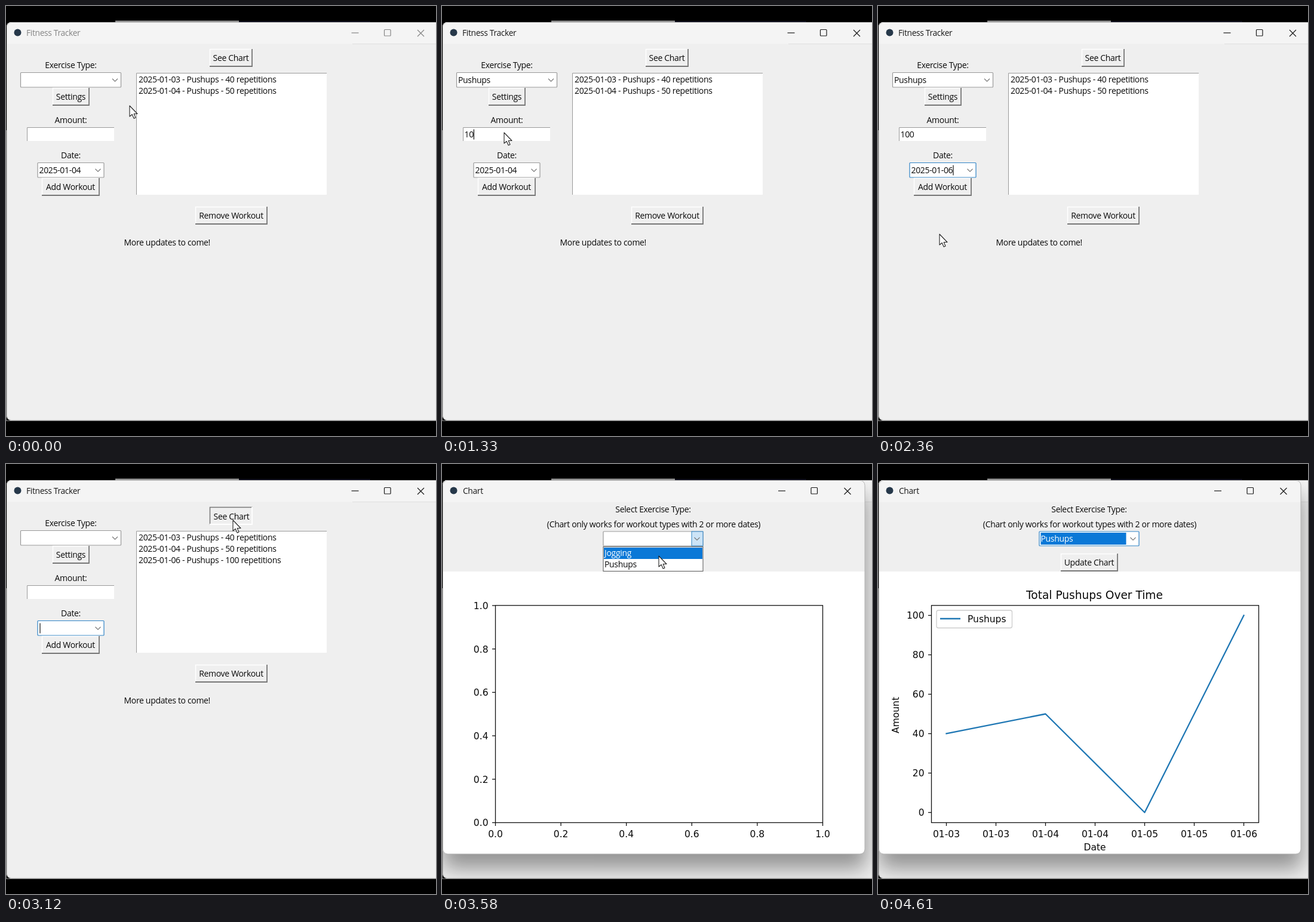
Animation, 720 px wide and 720 px high, one loop 4.7 s. Source, as an HTML page:

```html
<!DOCTYPE html>
<html lang="en">
<head>
<meta charset="utf-8">
<title>Fitness Tracker</title>
<style>
  html, body { margin: 0; width: 100%; height: 100%; overflow: hidden; background: #000; }
  svg { display: block; width: 100vw; height: 100vh; }
  text { font: 14px "Open Sans", "Noto Sans", sans-serif; letter-spacing: -.33px; fill: #0a0a0a; }
  .title { font-size: 13.8px; }
  .cal text { font: 14.5px "Liberation Sans", Arial, sans-serif; letter-spacing: 0; }
  .cal .head { font-size: 15.2px; fill: #eee; }
  .plot text { font: 15.5px "DejaVu Sans", sans-serif; letter-spacing: 0; }
  .plot .name { font-size: 18.6px; }
</style>
</head>
<body>
<svg viewBox="0 0 720 720">
  <defs>
    <clipPath id="screen"><rect y="25" width="720" height="670"/></clipPath>
    <clipPath id="win"><rect x="1" y="27" width="740" height="667" rx="8"/></clipPath>
    <filter id="blur" x="-20%" y="-20%" width="140%" height="140%"><feGaussianBlur stdDeviation="17"/></filter>
  </defs>
  <g id="scene"></g>
  <g clip-path="url(#screen)">
    <path id="cursor" d="M0 0V18L4.2 14.5 7.2 21.2 10 20 7.2 13.5H13Z" fill="#fff" stroke="#222" stroke-width="1.1" stroke-linejoin="round"/>
  </g>
</svg>
<script>
const LOOP = 4700;
const BLUE = '#0a78d7';
const FOCUS = '#2f83c6';

// Interface changes: [time, changed fields]
const steps = [
  [0, { type: '', amount: '', date: '2025-01-04', rows: 2, chartType: '' }],
  [240, { active: true, open: 'type' }],
  [520, { open: '', type: 'Pushups', focus: 'type' }],
  [940, { focus: 'amount' }],
  [1180, { amount: '1' }],
  [1300, { amount: '10' }],
  [1420, { amount: '100' }],
  [1730, { focus: 'date', open: 'date' }],
  [1890, { open: 'calendar' }],
  [2270, { open: '', date: '2025-01-06' }],
  [2620, { pressed: 'Add Workout' }],
  [2700, { pressed: '', type: '', amount: '', date: '', rows: 3 }],
  [3100, { pressed: 'See Chart' }],
  [3190, { pressed: '' }],
  [3240, { chart: true }],
  [3420, { open: 'chart' }],
  [3680, { open: '', chartType: 'Pushups', focus: 'chart' }],
  [3820, { pressed: 'Update Chart' }],
  [3890, { pressed: '', plotted: true }],
];

// Pointer path: [time, x, y]
const path = [
  [0, 207, 167], [30, 207, 167], [200, 178, 123], [260, 178, 123], [500, 134, 170],
  [660, 134, 170], [900, 104, 212], [1440, 104, 212], [1690, 156, 269], [1820, 156, 269],
  [2180, 103, 382], [2380, 103, 382], [2580, 108, 300], [2860, 108, 300], [3080, 380, 94],
  [3240, 380, 94], [3370, 424, 121], [3420, 424, 121], [3570, 363, 154], [3590, 363, 154],
  [3660, 365, 165], [3720, 365, 165], [3800, 357, 162], [3970, 357, 162], [4030, 378, 165],
  [4270, 378, 165], [4570, 330, 700], [LOOP, 330, 700],
];

const workouts = [['03', 40], ['04', 50], ['06', 100]]
  .map(([day, n]) => `2025-01-${day} - Pushups - ${n} repetitions`);

const list = (n, fn) => Array.from({ length: n }, (_, i) => fn(i)).join('');
const rect = (x, y, w, h, fill, more = '') =>
  `<rect x="${x}" y="${y}" width="${w}" height="${h}" fill="${fill}" ${more}/>`;
const line = (d, color, width = 1, more = '') =>
  `<path d="${d}" fill="none" stroke="${color}" stroke-width="${width}" ${more}/>`;
// y is the vertical middle of the capitals
const text = (x, y, s, anchor = 'start', more = '') =>
  `<text x="${x}" y="${y + 4.9}" text-anchor="${anchor}" ${more}>${s}</text>`;
const label = (x, y, s) => text(x, y, s, 'middle');

function button(x, y, w, s, pressed) {
  const down = s === pressed;
  const r = x + w, b = y + 30, shift = down ? 1 : 0;
  const [light, dark] = down ? ['#777', '#fff'] : ['#fff', '#777'];
  return rect(x, y, w, 30, '#efefef') +
    line(`M${x + .5} ${b}V${y + .5}H${r}`, light, 1.5) +
    line(`M${r - 1} ${y}V${b - 1}H${x}`, dark, 1.8) +
    label(x + w / 2 - .5 + shift, y + 14.6 + shift, s);
}

const sunken = (x, y, w, h) => rect(x, y, w, h, '#fff') +
  line(`M${x + .5} ${y + h}V${y + .5}H${x + w}`, '#9a9a9a');

const caret = (x, y) => line(`M${x} ${y - 8}V${y + 9}`, '#111', 1.2);

function combo(x, y, w, h, s, { focus, hot, selected }) {
  const r = x + w, mid = y + h / 2, cx = r - 10.5;
  return rect(x + .5, y + .5, w - 1, h - 1, '#fff', `stroke="${focus ? FOCUS : '#999'}" stroke-width="1.2" rx="1"`) +
    (hot ? rect(r - 19.5, y + .5, 19, h - 1, '#cce4f7', `stroke="${FOCUS}"`) : '') +
    (selected ? rect(x + 3, y + 2.5, w - 25, h - 5, BLUE) : '') +
    line(`M${cx - 4.5} ${mid - 2}l4.5 4.5 4.5 -4.5`, '#777', 1.1) +
    text(x + 3, mid + .2, s, 'start', selected ? 'style="fill:#fff"' : '');
}

function popup(x, y, hover) {
  const items = ['Jogging', 'Pushups'];
  return rect(x + .5, y + .5, 167, 41, '#fff', 'stroke="#555"') +
    items.map((s, i) => (i === hover ? rect(x + 1.5, y + 2 + i * 19, 165, 19, BLUE) : '') +
      text(x + 2.5, y + 11.5 + i * 19, s, 'start', i === hover ? 'style="fill:#fff"' : '')).join('');
}

function titleBar(s, min, active) {
  const ink = active ? '#1a1a1a' : '#858585';
  return '<circle cx="19.5" cy="44.5" r="6" fill="#26384a"/>' +
    text(s === 'Chart' ? 35 : 34, 45, s, 'start', `class="title" style="fill:${ink}"`) +
    line(`M${min} 45h12`, ink, 1.2) +
    rect(min + 55, 39.5, 10.5, 10.5, 'none', `rx="1" stroke="${ink}" stroke-width="1.2"`) +
    line(`M${min + 110.5} 40l11 11m0 -11l-11 11`, ink, 1.2);
}

function calendar() {
  const colX = i => 82 + i * 37.7, rowY = j => 341 + j * 27.1;
  const arrow = (x, dir) => rect(x, 290, 20, 21, '#f4f4f4') +
    `<path d="M${x + 10 - 3 * dir} 295.5v10l${6 * dir} -5z" fill="#111"/>`;
  const cell = k => {
    const i = k % 7, j = Math.floor(k / 7), n = k - 1;
    const other = n < 1 || n > 31, weekend = i > 4, chosen = n === 4;
    const day = n < 1 ? n + 31 : n > 31 ? n - 31 : n;
    const bg = chosen ? BLUE : weekend ? (other ? '#bebebe' : '#cbcbcb') : other ? '#eee' : '#fff';
    const ink = chosen ? '#fff' : other ? (weekend ? '#808080' : '#999') : weekend ? '#737373' : '#111';
    return rect(colX(i), rowY(j), 37.7, 27.1, bg, 'stroke="#c4c4c4"') +
      text(colX(i) + 18.5, rowY(j) + 12.9, day, 'middle', `style="fill:${ink}"`);
  };
  const days = ['Mon', 'Tue', 'Wed', 'Thu', 'Fri', 'Sat', 'Sun'];
  return '<g class="cal">' + rect(53, 287, 296, 219, '#4d4d4d') + rect(55, 317, 292, 187, '#b4b4b4') +
    arrow(55, -1) + arrow(175, 1) + arrow(254, -1) + arrow(325, 1) +
    text(125, 301.5, 'January', 'middle', 'class="head"') +
    text(300, 301.5, '2025', 'middle', 'class="head"') +
    list(7, i => label(colX(i) + 18.3, 329, days[i])) +
    list(6, j => label(72, rowY(j) + 14, j + 1)) +
    list(42, cell) + '</g>';
}

function tracker(s, hover) {
  const field = name => ({ focus: s.focus === name, hot: s.open === name });
  const dateEnd = s.date ? 126 : 57;
  return rect(1, 27, 740, 667, '#efefef', 'rx="8"') +
    '<g clip-path="url(#win)">' + rect(0, 27, 720, 36.5, '#f4f4f4') + '</g>' +
    line('M580 63.5H720', '#dfdfdf') +
    rect(1.5, 27.5, 740, 666, 'none', 'rx="8" stroke="#c4c4c4"') +
    titleBar('Fitness Tracker', 578.5, s.active) +
    label(108.5, 99.5, 'Exercise Type:') +
    combo(24, 111, 169, 25.5, s.type, { ...field('type'), selected: s.focus === 'type' }) +
    button(78, 137, 62, 'Settings', s.pressed) +
    label(108.5, 191.5, 'Amount:') +
    sunken(35, 203, 146, 23) + text(37.5, 215, s.amount) +
    (s.focus === 'amount' ? caret(38 + 7.7 * s.amount.length, 214.5) : '') +
    label(108.5, 250.5, 'Date:') +
    combo(52.5, 262, 112, 25.5, s.date, field('date')) +
    (s.focus === 'date' ? caret(dateEnd, 274.5) : '') +
    button(60, 288, 97, 'Add Workout', s.pressed) +
    button(341, 72, 72, 'See Chart', s.pressed) +
    sunken(218, 112, 319, 204) +
    list(s.rows, i => text(222, 123.5 + i * 18.7, workouts[i])) +
    button(317, 336, 121, 'Remove Workout', s.pressed) +
    text(197.5, 396.5, 'More updates to come!') +
    (s.open === 'type' ? popup(24.5, 137, hover) : '') +
    (s.open === 'date' || s.open === 'calendar' ? calendar() : '');
}

function axes(xs, xNames, ys, yNames) {
  return rect(89.5, 236.8, 548, 363.7, '#fff', 'stroke="#111" stroke-width="1.3"') +
    xs.map((x, i) => line(`M${x} 600.5v5.5`, '#111', 1.3) + text(x, 619.8, xNames[i], 'middle')).join('') +
    ys.map((y, i) => line(`M89.5 ${y}h-5.5`, '#111', 1.3) + text(77.5, y + 1, yNames[i], 'end')).join('');
}

function plot(filled) {
  const six = [0, 1, 2, 3, 4, 5];
  if (!filled) {
    const names = six.map(i => (i / 5).toFixed(1));
    return axes(six.map(i => 89.5 + i * 109.6), names, six.map(i => 600.5 - i * 72.7), names);
  }
  const px = i => 114.5 + i * 83, py = v => 583.5 - v * 3.3;
  const dates = ['01-03', '01-03', '01-04', '01-04', '01-05', '01-05', '01-06'];
  const points = [40, 50, 0, 100].map((v, i) => `${px(2 * i)} ${py(v)}`).join('L');
  return axes(dates.map((_, i) => px(i)), dates, six.map(i => py(20 * i)), six.map(i => 20 * i)) +
    line('M' + points, '#1f77b4', 2.3, 'stroke-linecap="square" stroke-linejoin="round"') +
    text(362.5, 221.3, 'Total Pushups Over Time', 'middle', 'class="name"') +
    label(363, 642.3, 'Date') +
    text(0, 0, 'Amount', 'middle', 'transform="translate(30.5 420.5) rotate(-90)"') +
    rect(98, 245, 126.5, 29.5, '#fff', 'rx="3" stroke="#ccc" stroke-width="1.3"') +
    line('M104 259H138', '#1f77b4', 2.3) + text(150, 260, 'Pushups');
}

function chart(s, hover) {
  return '<g clip-path="url(#win)">' +
    rect(2, 50, 708, 628, '#000', 'rx="8" opacity=".38" filter="url(#blur)"') + '</g>' +
    rect(1, 27, 707, 626, '#fff', 'rx="8"') +
    '<path d="M1 64V35a8 8 0 0 1 8 -8H700a8 8 0 0 1 8 8V64Z" fill="#f4f4f4"/>' +
    rect(1, 64, 707, 116, '#efefef') +
    rect(1.5, 27.5, 706.5, 625.5, 'none', 'rx="8" stroke="#b4b4b4"') +
    titleBar('Chart', 563, true) +
    label(353.5, 76, 'Select Exercise Type:') +
    label(354.5, 101, '(Chart only works for workout types with 2 or more dates)') +
    combo(269.5, 112.5, 168, 25, s.chartType,
      { focus: s.focus === 'chart', hot: s.open === 'chart', selected: s.focus === 'chart' }) +
    button(306, 150, 96, 'Update Chart', s.pressed) +
    (s.open === 'chart' ? popup(269.5, 138, hover) : '') +
    `<g class="plot">${plot(s.plotted)}</g>`;
}

const desktop = rect(0, 0, 720, 720, '#000') + rect(183, 24.5, 207, 2.5, '#999') +
  rect(390, 25, 220, 2, '#10101e') + rect(0, 208, 1, 486, '#777') + rect(0, 694, 720, 1, '#888');

function pointer(t) {
  const i = path.findIndex(p => p[0] > t);
  const [t0, x0, y0] = path[i - 1], [t1, x1, y1] = path[i];
  const u = (t - t0) / (t1 - t0), e = u * u * (3 - 2 * u);
  return [x0 + (x1 - x0) * e, y0 + (y1 - y0) * e];
}

const scene = document.getElementById('scene');
const cursor = document.getElementById('cursor');
let drawn = '';

function render(t) {
  const [x, y] = pointer(t);
  const past = steps.filter(([at]) => at <= t);
  const s = Object.assign({}, ...past.map(step => step[1]));
  const hover = y < 140 ? -1 : y < 159 ? 0 : 1;
  const key = `${past.length}:${hover}`;
  if (key !== drawn) {
    scene.innerHTML = desktop + tracker(s, hover) + (s.chart ? chart(s, hover) : '');
    drawn = key;
  }
  cursor.setAttribute('transform', `translate(${x.toFixed(2)} ${y.toFixed(2)})`);
}

const start = performance.now();
function tick() {
  render((performance.now() - start) % LOOP);
  requestAnimationFrame(tick);
}
tick();
</script>
</body>
</html>
```
